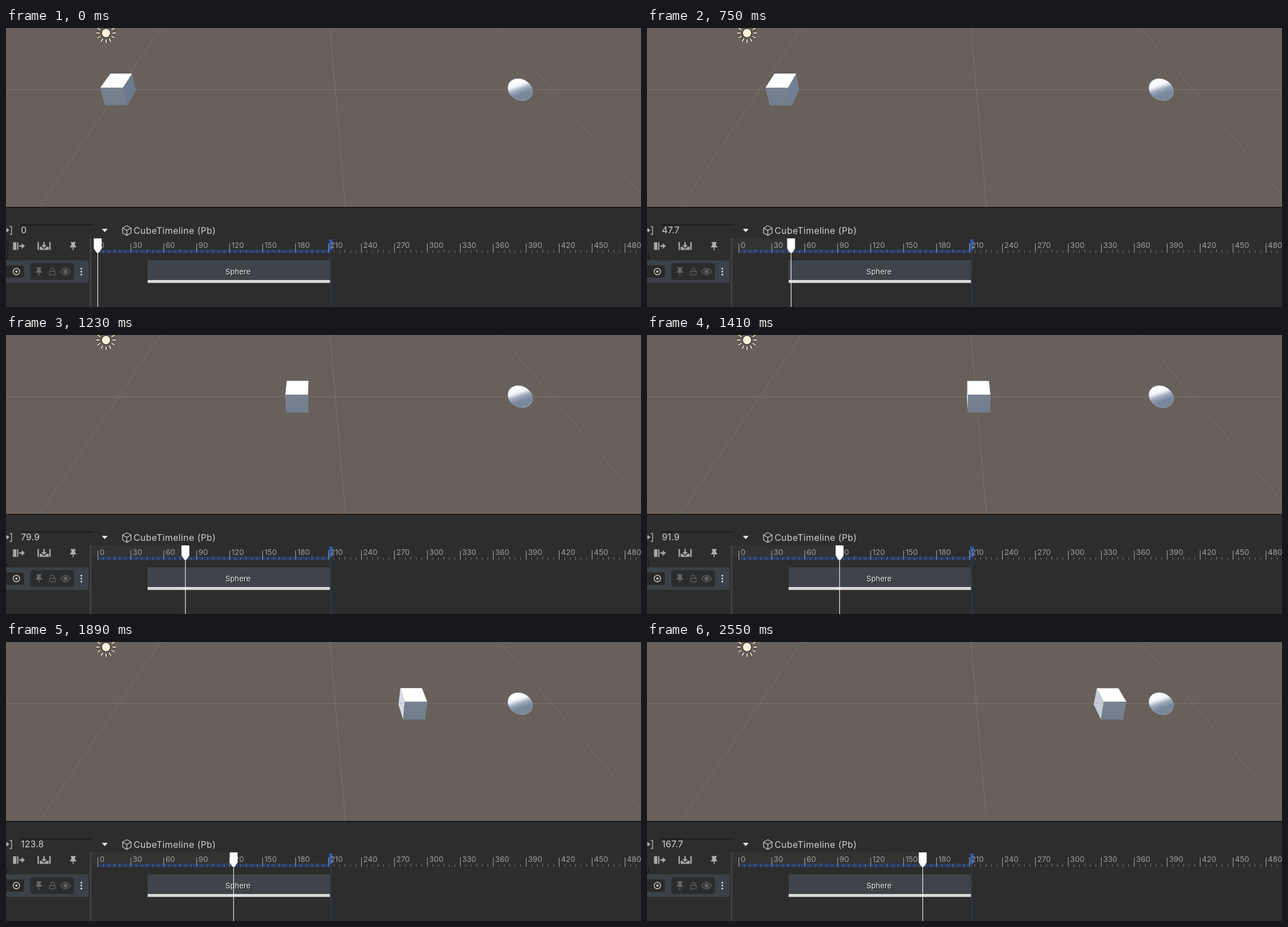
An HTML page that plays this animation: 1130 by 496 pixels, repeating every 2.58 s.

```html
<!DOCTYPE html>
<html lang="en">
<head>
<meta charset="utf-8">
<title>Timeline playback</title>
<style>
  html, body { margin: 0; width: 100%; height: 100%; overflow: hidden; background: #2d2d2d; }
  svg { display: block; width: 1130px; height: 496px; }
  text { font-family: Inter, Roboto, sans-serif; }
</style>
</head>
<body>
<svg viewBox="0 0 1130 496" xmlns="http://www.w3.org/2000/svg">
  <defs>
    <linearGradient id="ball" gradientUnits="userSpaceOnUse" x1="908" y1="96" x2="915.5" y2="118" gradientTransform="rotate(-28 915 109.5)">
      <stop offset="0" stop-color="#fff"/>
      <stop offset=".3" stop-color="#f0f4fa"/>
      <stop offset=".65" stop-color="#9aa7ba"/>
      <stop offset="1" stop-color="#7a889c"/>
    </linearGradient>
    <linearGradient id="front" x1="0" y1="0" x2="0" y2="1">
      <stop offset="0" stop-color="#788291"/>
      <stop offset="1" stop-color="#727e8d"/>
    </linearGradient>
    <clipPath id="view"><rect width="1130" height="318"/></clipPath>
  </defs>

  <!-- scene -->
  <g clip-path="url(#view)">
    <rect width="1130" height="318" fill="#68605a"/>
    <path d="M0 109.5H1130M275 0L60 317M576.5 0L604 318M878.5 0L1130 296" stroke="#777b78" stroke-width="1" fill="none" opacity=".85"/>
    <g id="sun"></g>
    <g id="cube">
      <polygon id="right"/>
      <polygon id="left"/>
      <polygon id="face" fill="url(#front)"/>
      <polygon id="top" fill="#fff"/>
      <path id="trace" stroke="#8c949c" opacity=".5"/>
    </g>
    <ellipse cx="915" cy="109.5" rx="22.8" ry="18.6" transform="rotate(28 915 109.5)" fill="url(#ball)" stroke="#a9b5c6" stroke-width=".6"/>
  </g>

  <!-- toolbar -->
  <rect y="318" width="1130" height="2" fill="#191919"/>
  <rect y="320" width="1130" height="176" fill="#2d2d2d"/>
  <path d="M25 350H155" stroke="#191919" stroke-width="1.6"/>
  <path d="M0 359.5H2" stroke="#b4b4b4" stroke-width="1.5"/>
  <path d="M1 355.5L6 359.5L1 363.5Z" fill="#b4b4b4"/>
  <path d="M6.5 353H10V367H6.5" stroke="#b4b4b4" stroke-width="1.4" fill="none"/>
  <text id="count" x="26.5" y="365.2" font-size="16" letter-spacing=".2" fill="#d2d2d2"></text>
  <path d="M170.5 357H181L175.7 363Z" fill="#e4e4e4"/>
  <path d="M215 351.5L222.5 355.5V364.5L215 368.7L207.5 364.5V355.5ZM207.5 355.5L215 359.8L222.5 355.5M215 359.8V368.7" fill="none" stroke="#c4c4c4" stroke-width="1.4" stroke-linejoin="round"/>
  <text x="227" y="365.6" font-size="16" letter-spacing=".43" fill="#cfcfcf">CubeTimeline (Pb)</text>

  <path id="edge" stroke="#191919" stroke-width="1.4" fill="none"/>
  <g fill="#a8a8a8">
    <path d="M12.5 381H18.5V394.5H12.5ZM20 381H22V394.5H20ZM23.5 386.3H28V382.5L33.5 387.6L28 392.7V389H23.5Z"/>
    <path d="M56 380.5H58.5V394.5H56ZM77 380.5H79.5V394.5H77ZM60 389H63L67.8 393L72.5 389H76V394.5H60ZM66.5 380.5H69V386H72.5L67.8 391L63 386H66.5Z"/>
  </g>
  <path id="pin" d="M115 380.5H124V382.3H122.7V386.5L125 388.5V390H120.3V395H118.7V390H114V388.5L116.3 386.5V382.3H115Z" fill="#b0b0b0"/>

  <!-- track header -->
  <rect y="413" width="147" height="40" fill="#3c4147"/>
  <rect x="-6" y="422" width="38" height="22" rx="4" fill="#292929"/>
  <circle cx="18.5" cy="433" r="5.8" fill="none" stroke="#d0d0d0" stroke-width="1.4"/>
  <circle cx="18.5" cy="433" r="2" fill="#d0d0d0"/>
  <rect x="43" y="418" width="78" height="30" rx="5" fill="#2b2c2d"/>
  <use href="#pin" x="-61" y="45" opacity=".45"/>
  <g fill="none" stroke="#5e6062" stroke-width="1.3">
    <path d="M77.5 432.5H87.5V438.8H77.5ZM79.5 430V429.5A3.2 3.2 0 0 1 85.8 429.5V432"/>
    <path d="M97 433Q106 421.5 115 433Q106 444.5 97 433Z"/>
    <circle cx="106" cy="433" r="3.2" fill="#5e6062"/>
  </g>
  <g fill="#e8e8e8">
    <circle cx="134" cy="427.7" r="1.5"/><circle cx="134" cy="433" r="1.5"/><circle cx="134" cy="438.3" r="1.5"/>
  </g>
  <rect x="149" y="374" width="3" height="122" fill="#414141"/>

  <!-- ruler and clip -->
  <rect id="played" x="152" y="374" height="20" fill="#333"/>
  <rect x="163" y="394" width="415" height="6" fill="#293c62"/>
  <path d="M578 395V496" stroke="#2a4566" stroke-width="1"/>
  <rect x="575" y="376" width="6" height="19" fill="#2a58ab"/>
  <g id="ruler"></g>
  <rect x="252" y="413" width="324.5" height="35" fill="#3f444a"/>
  <rect x="252" y="448" width="324.5" height="5.2" fill="#d9d9d9"/>
  <g font-size="13.3">
    <text x="391.4" y="439" fill="#111">Sphere</text>
    <text x="390.4" y="438" fill="#f0f0f0">Sphere</text>
  </g>
  <g id="head">
    <path d="M0 398V496" stroke="#fff" stroke-width="1.1"/>
    <path d="M-7 374H7V392L2 399.5H-2L-7 392Z" fill="#fff"/>
  </g>
</svg>
<script>
const LOOP = 2580, STEP = 30;
const ZERO = 163.5, UNIT = 1.9545;
const $ = id => document.getElementById(id);

function add(parent, name, attrs, text) {
  const el = document.createElementNS("http://www.w3.org/2000/svg", name);
  for (const key in attrs) el.setAttribute(key, attrs[key]);
  if (text !== undefined) el.textContent = text;
  parent.appendChild(el);
}

function buildSun() {
  const sun = $("sun");
  for (const [color, width] of [["#2f2a26", 3.6], ["#fef0d8", 2]]) {
    for (let i = 0; i < 12; i++) {
      add(sun, "path", {
        d: "M11.5 0H17.5", stroke: color, "stroke-width": width,
        transform: `translate(178 9) rotate(${i * 30})`
      });
    }
  }
  add(sun, "circle", { cx: 178, cy: 9, r: 8, fill: "#fef0d8", stroke: "#2a2622", "stroke-width": 1.2 });
}

function buildRuler() {
  const ruler = $("ruler");
  for (let n = 0; n <= 490; n += 5) {
    const x = ZERO + n * UNIT;
    const major = n % 30 === 0;
    const y = major ? 383 : n % 15 === 0 ? 394 : 395.5;
    add(ruler, "path", { d: `M${x} ${y}V399.5`, stroke: major ? "#b4b4b4" : "#858585", "stroke-width": 1 });
    if (major) add(ruler, "text", { x: x + 3.2, y: 391, "font-size": 13.5, fill: "#a2a2a2" }, n);
  }
}

const clamp = k => Math.max(0, Math.min(1, k));
const mix = (a, b, k) => `rgb(${a.map((c, i) => Math.round(c + (b[i] - c) * clamp(k)))})`;

function poly(id, ...points) {
  $(id).setAttribute("points", points.map(p => p.map(c => c.toFixed(2)).join()).join(" "));
}

// x is the left end of the front top edge; other corners shift with perspective
function drawCube(x) {
  const k = (x - 168) / 645;
  const backY = 81 + k * 1.2, lowY = 137.2 + 0.8 * clamp(k * 4);
  const low = x - (x - 583) * 0.0217;
  const back = x - (x - 548) * 0.0473;
  const deep = x - (x - 546) * 0.0674;
  const ftl = [x, 106], ftr = [x + 40, 106];
  const fbl = [low, lowY], fbr = [low + 39, lowY];
  const btl = [back, backY], btr = [back + 38.5, backY];
  const bbl = [deep, 111], bbr = [deep + 37.5, 111];
  poly("right", ftr, btr, bbr, fbr);
  poly("left", ftl, btl, bbl, fbl);
  poly("face", ftl, ftr, fbr, fbl);
  poly("top", ftl, ftr, btr, btl);
  $("right").setAttribute("fill", mix([108, 122, 143], [131, 144, 166], k * 3));
  $("left").setAttribute("fill", mix([228, 234, 243], [195, 204, 216], (x - 600) / 213));
  $("trace").setAttribute("d", x > 700 ? `M${deep + 1} 109.5H${x - 3}` : "");
}

function draw(time) {
  const t = Math.floor(time / STEP) * STEP;
  const lag = t < 1110 ? 2.3 : 2.1 + Math.max(0, t - 1620) / 4650;
  const frame = Math.max(0, t / 15 - lag);
  const headX = 163.3 + frame * 1.952;
  $("count").textContent = Number(frame.toFixed(1));
  $("head").setAttribute("transform", `translate(${headX} 0)`);
  $("played").setAttribute("width", t < STEP ? 0 : headX - 152);
  $("edge").setAttribute("d", t < STEP ? "M0 379H3.3V409.5H0" : "M3.3 401V409.5H0");
  drawCube(912 - 744 * Math.exp(-0.0163 * Math.max(0, frame - 44.04)));
}

buildSun();
buildRuler();
draw(0);
const start = performance.now();
function tick() {
  draw((performance.now() - start) % LOOP);
  requestAnimationFrame(tick);
}
requestAnimationFrame(tick);
</script>
</body>
</html>
```
